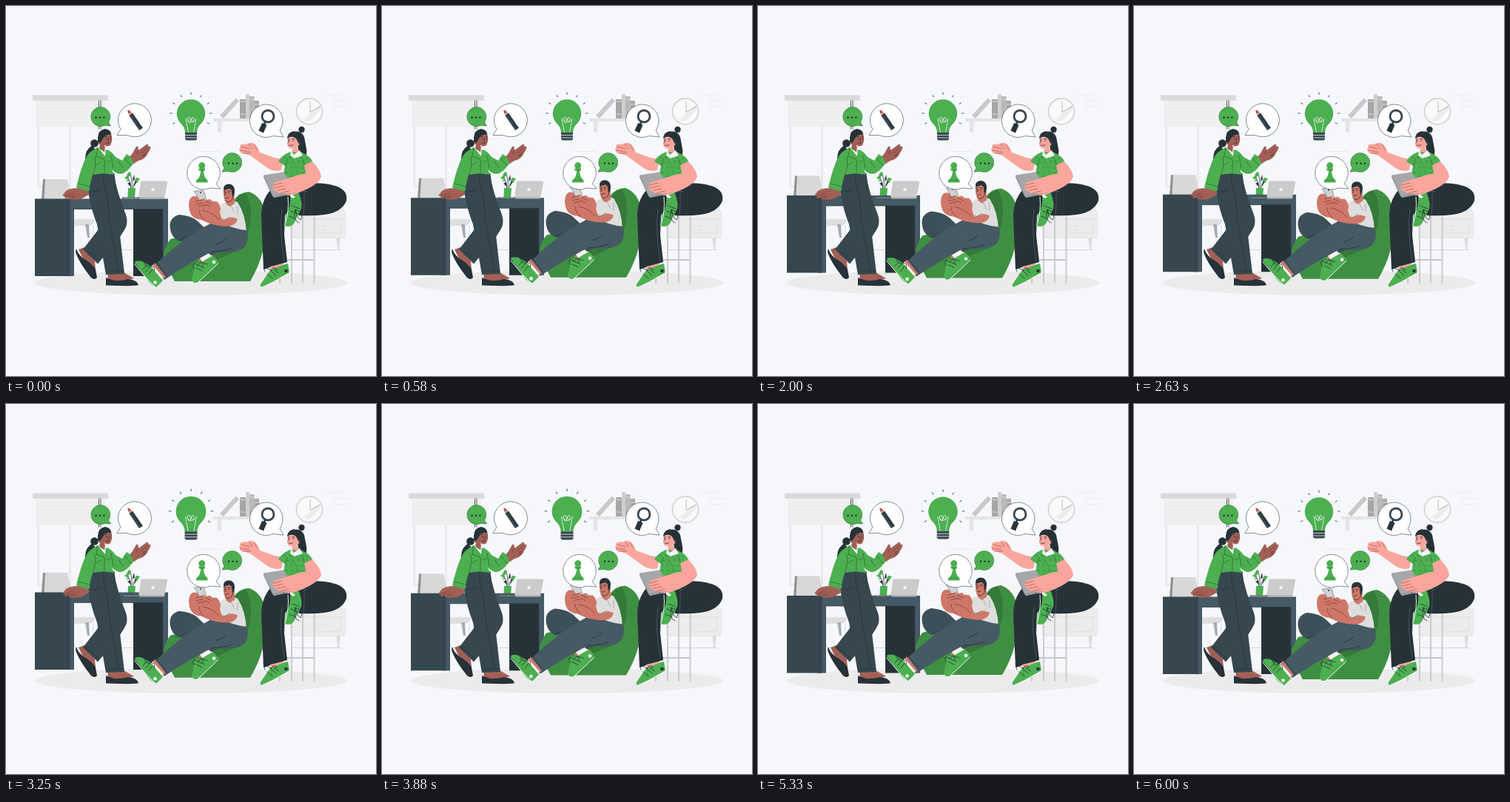
An HTML page that plays this animation: 500 by 500 pixels, repeating every 6.04 s.

```html
<!DOCTYPE html>
<html lang="en">
<head>
<meta charset="utf-8">
<title>Team sharing ideas</title>
<style>
html, body { margin: 0; height: 100%; overflow: hidden; background: #f5f7fb; }
svg { display: block; width: 100vw; height: 100vh; }
.line { fill: none; stroke-linecap: round; stroke-linejoin: round; }
.green { fill: #4caf50; }
.ink { fill: #263238; }
.slate { fill: #37474f; }
.steel { fill: #455a64; }
.tan { fill: #a35f56; }
.brown { fill: #ce7768; }
.pink { fill: #faa69c; }
.thin { stroke: #263238; stroke-width: .8; }
.pale { stroke: #e2e4e6; stroke-width: 1.4; }
.bubble { fill: #fff; stroke: #263238; stroke-width: .55; stroke-linejoin: round; }
</style>
</head>
<body>
<svg viewBox="0 0 500 500">
  <ellipse cx="250" cy="374" rx="211" ry="17" fill="#ebebeb"/>

  <!-- room -->
  <g>
    <path class="line" stroke="#e6e8ea" stroke-width="2.600" d="M43.500 162V244H50M86.500 162V262"/>
    <path fill="#f0f0f1" d="M40 128H134V162.500H40Z"/>
    <path class="line" stroke="#e4e5e7" stroke-width=".6" d="M41 133H133M41 138H133M41 143H133M41 148H133M41 153H133M41 158H133M40 162.500H134"/>
    <path fill="#dadada" d="M36 120.500H138V128H36Z"/>
    <path class="line thin" d="M125.500 128V166M128 128V166"/>
    <path class="line" stroke="#c5c8cb" stroke-width=".7" d="M155 329.500H172M385 329.500H453"/>
    <path fill="#e4e4e4" d="M280 152H346V156H291V171H286V156H280Z"/>
    <path fill="#c9c9c9" d="M289 148L310.500 124.500L315 128.500L294 152Z"/>
    <path fill="#a6a6a6" d="M316 126H324V152H316Z"/>
    <path fill="#cfcfcf" d="M324 119H329V152H324Z"/>
    <path fill="#b9b9b9" d="M329 122H335.500V152H329Z"/>
    <path fill="#a9a9a9" d="M335.500 128H342V152H335.500Z"/>
    <path class="line" stroke="#e2e2e2" stroke-width=".8" d="M317 129H323M317 146H323M330 126H335M336 133H341"/>
    <circle cx="410" cy="142.500" r="17.500" fill="#fafafa" stroke="#d7d7d7" stroke-width="2"/>
    <path fill="#ececec" d="M400 155L424 134L425 140L410 156Z"/>
    <path class="line" stroke="#a5a7a9" stroke-width=".8" d="M411 129V143.500L424.500 136"/>
    <path class="line" stroke="#e8eaed" d="M433 120H453M444 128H463M444 136H458M443 129V136M262 196.500H290"/>
    <path fill="#ececed" stroke="#e3e3e4" d="M385 276H458V313.500H385Z"/>
    <path class="line" stroke="#dfdfe0" d="M386 288H457M419 288V307H453V288M423 297H432V302H423Z"/>
    <path fill="#dcdcdc" d="M446.500 313.500H451.500L450 329H448Z"/>
    <path fill="#dfdfe0" d="M90 288H120Q119 297 111 297H90Z"/>
    <path fill="#a9abad" d="M107 295H112L113 313H110Z"/>
    <path class="line pale" d="M118 297V329"/>
  </g>

  <!-- plant -->
  <g>
    <path class="line thin" d="M169 247Q168 237 164 230M170 247Q171 236 168 227M171 247Q175 242 176 235"/>
    <path class="green" d="M160 232L163 230L165 225L168 224L169 228L166 231L164 235ZM173 237L176 232L181 233L177 239ZM162 237L166 234L167 237Z"/>
    <path class="ink" d="M170.500 237L173 228L174 234ZM164 240L168 238L169 244ZM171 244L175 237L177 238Z"/>
    <path class="green" d="M165 246H175L174 259H164.500Z"/>
  </g>

  <!-- desk -->
  <g id="desk">
    <path fill="#d8d8d8" d="M52 234H83L89 261H50Z"/>
    <path fill="#8f9193" d="M50 234H53L51.500 261H48Z"/>
    <path class="ink" d="M172 273H212V365H172Z"/>
    <path class="steel" d="M80 260.500H219V365H212V274.500H92V365H80Z"/>
    <path class="slate" d="M39 260.500H86V365H39Z"/>
    <path class="line" stroke="#2b383f" stroke-width=".7" d="M86 262V365M92 274.500H212"/>
  </g>
  <g>
    <path fill="#cbcbcc" d="M184 236.500H216Q218.500 236.500 218 239L214 260H179L182 239Q182 236.500 184 236.500Z"/>
    <path fill="#aeb0b1" d="M179 258.500H214L213.500 260.500H178Z"/>
    <circle cx="198.500" cy="248" r="2.300" fill="#f2f2f2"/>
    <path class="slate" d="M157 258.500H180V260.500H157Z"/>
    <path class="line" stroke="#c8cacb" stroke-width=".7" d="M159 259.300H178"/>
  </g>

  <!-- standing woman -->
  <g>
    <path class="tan" d="M98 329L106 326L120 345L122 368L117 368Z"/>
    <path class="ink" d="M95 328Q98 338 109 344Q118 350 121 356L123 367Q120 371 115 367Q98 346 94 332Z"/>
    <path class="tan" d="M137 360L159 360L173 368Q162 373 138 370Z"/>
    <path class="ink" d="M135 367Q149 374 165 369Q177 370 179 377Q178 379 135 377.500Z"/>
    <path class="slate" d="M130 228H146Q150 252 162 282Q165 292 162 299Q156 310 150 317L124 348.500L104 329L128 298Z"/>
    <path class="slate" d="M118 226H146.500Q149 246 149.500 270L160 362L135 363L123 295Q115 275 111 251Q112 238 118 226Z"/>
    <path class="line thin" d="M134 247Q139 270 140 292L152 358M128 248Q120 253 115 250M106 328L126 344M135 358H159M131 229L134 247M148 249Q146 246 146 239"/>
    <circle class="ink" cx="119.500" cy="185.500" r="5.300"/>
    <path class="ink" d="M117 188Q107 194 107 206Q107 214 111 217Q119 210 121 195Z"/>
    <path class="tan" d="M126 178Q133 171 142 172Q145 181 141 188Q137 191 133 188L134 199L125 199L127 188Q122 184 126 178Z"/>
    <path class="ink" d="M124 178Q125 167 134 166Q142 167 142 174Q134 172 130 181L127 185L124 184Z"/>
    <path class="line thin" d="M134 177L136 176.500M140 176.500L142 177M138 179L139 183M135 185Q138 186.500 140 185"/>
    <circle class="ink" cx="136" cy="179.500" r=".8"/><circle class="ink" cx="141" cy="179.500" r=".8"/>
    <path class="tan" d="M98 246Q86 246 81 250L77 255Q76 257 79 257L80 260L84 259L88 262L101 261L112 255L111 245Z"/>
    <path class="line" stroke="#623832" stroke-width=".7" d="M80 257L90 253M83 259L92 256M88 261L95 257"/>
    <path class="tan" d="M161 211L171 199L176 190Q179 188 179 195L190 187Q193 186 192 190Q197 189 195 193L191 200Q188 207 179 209L168 216Z"/>
    <path class="line" stroke="#623832" stroke-width=".7" d="M179 195L176 200M192 190L183 199M194 194L185 202M191 200L185 204"/>
    <path class="green" d="M123 191Q131 195 135 194Q142 195 148 204L157 209L163 200Q171 204 172 213Q163 226 155 227Q149 227 143 221L146 228Q131 225 117 228L113 244Q114 252 109 250L95 245Q104 207 113 198Z"/>
    <path fill="#f5f5f5" d="M124 191L134 203L135 193L132 191L130 196Z"/>
    <path class="tan" d="M126 190L134 190L133 198Z"/>
    <path class="line" stroke="#28642d" stroke-width=".7" d="M120 202Q123 216 117 228M124 192L122 203L133 207L133 226M142 202L145 219M161 205Q165 213 169 215M128 211L122 215M136 211L141 209M98 240L112 244M152 210L158 219"/>
  </g>

  <!-- man on bean bag -->
  <g id="lounge">
    <path fill="#3f8f42" d="M228 372L213 344Q211 330 222 315L285 300L308 263Q314 252 328 251Q347 257 351 283Q355 330 330 372Z"/>
    <path fill="#357a38" d="M309 264Q315 253 324 253Q333 267 330 292Q327 325 303 335L270 350L272 321L318 306Z"/>

    <path class="brown" d="M273 330L282 340L270 351L260 344Z"/>
    <path fill="#f4f4f4" d="M262 341L275 333L280 340L269 350Z"/>
    <path class="green" d="M255 348L266 345L278 338Q285 340 287 347L276 357L259 374Q252 376 251 371Z"/>
    <path class="line" stroke="#fff" stroke-width="1" d="M286.500 348L276 358L259 374Q254 376 251.500 372"/>
    <circle cx="281" cy="346" r="2.300" fill="#fff"/>
    <path class="line thin" d="M259 350L268 354M257 354L265 358M263 346L272 349M259 350Q250 344 254 355M259 350Q267 342 266 352"/>
    <path fill="#3d5059" d="M222 302Q219 286 234 282Q249 283 258 290L298 328L277 337L260 323L233 317Q224 313 222 302Z"/>
    <path class="line thin" d="M233 317Q239 315 242 312"/>

    <path fill="#dedede" d="M291 268L302 262L313 265Q324 282 325 307L287 306L294 286L287 277Z"/>
    <path class="line" stroke="#9c9c9c" stroke-width=".8" d="M313 271Q314 286 306 295M303 267L309 280"/>
    <path class="steel" d="M200 351Q244 309 284 290Q308 302 325 303Q330 317 321 327Q310 336 278 332Q245 349 214 370Z"/>
    <path class="line thin" d="M284 322Q293 319 297 315M205 348L218 366M278 332Q298 331 306 327"/>

    <path class="brown" d="M299 260L309 258L309 267L302 271L297 267Z"/>
    <path class="brown" d="M294 247Q299 242 307 246Q311 253 307 262Q302 267 296 264Q293 256 294 247Z"/>
    <path class="ink" d="M294 249Q293 241 301 240.500Q309 241 309 250L307.500 257L305.500 257L305 249L302 246.500Z"/>
    <path class="line thin" stroke-width="1.200" d="M307 257Q306 264 300 265L296.500 263.500"/>
    <path class="line thin" d="M294.500 250.500L297 250M300 250L303 250.500M297 252L296 256M296.500 259.500Q299 260.500 301 258.500"/>
    <circle class="ink" cx="296" cy="252.500" r=".8"/><circle class="ink" cx="301" cy="252.500" r=".8"/>

    <path class="brown" d="M247 268Q248 255 257 257L270 264L285 264Q292 271 289 279L293 290L313 283Q314 294 304 297Q285 300 264 289Q247 288 247 268Z"/>
    <path fill="#cfd2d3" stroke="#75787a" stroke-width=".7" d="M254 250.500L265 249Q267 249 267.500 251L271 263L267 274L257 254Z"/>
    <circle cx="263" cy="252" r="1" class="ink"/>
    <path class="brown" d="M255 265Q256 261 261 262L268 260Q270 262 266 264L270 265L271 271L261 275ZM267 263L276 261L281 266L275 275L267 270Z"/>
    <path class="line" stroke="#713d34" stroke-width=".7" d="M257 264L265 262M257 268L266 266M260 271L269 269M270 264L278 268M269 268L275 271M266 276Q280 279 288 289M293 290L304 285M261 276Q261 284 268 289"/>
    <path fill="#dedede" d="M301 276L314 282L314 288L298 283Z"/>

    <path class="brown" d="M201 347L216 366L207 373L193 356Z"/>
    <path fill="#f4f4f4" d="M198 350L213 367L208 373L193 356Z"/>
    <path class="green" d="M174 347Q174 343 184 345L195 351L212 371L203 380Q195 377 189 367Z"/>
    <path class="line" stroke="#fff" d="M174 349L189 367L202 380"/>
    <circle cx="201.500" cy="373.500" r="2.300" fill="#fff"/>
    <path class="line thin" d="M191 349L185 356M195 352L189 359M198 356L193 363M190 352Q181 340 193 348M191 352Q204 350 200 359"/>
  </g>

  <!-- woman on stool -->
  <g>
    <path class="line" stroke="#c6c7c9" stroke-width="1.800" d="M370 260V374M386 260V374M401 260V374M416.500 260V374M370 343H416M386 282H416"/>
    <path class="pink" d="M375 207L363 205Q354 202 343 198Q341 190 335 186Q330 183 328 186L318 187Q315 189 317 191Q314 193 316 196Q316 199 320 199L330 202L352 218Q362 225 372 222Z"/>
    <path class="line" stroke="#a2564e" stroke-width=".7" d="M318 190L329 193M317 195L329 197M320 199L331 199M328 186L333 193M335 187L339 194"/>
    <path class="ink" d="M374 232L407 234L410 239Q437 239 450 245Q462 251 460 263Q454 279 430 282Q414 284 396 283L389 268L377 283L376 310L380 346L348 356L345 284Q345 262 358 248Z"/>
    <path class="line" stroke="#53636b" stroke-width=".7" d="M403 250Q404 266 402 283M397 249L407 251M373 274Q369 307 376 344M398 247Q386 257 387 268"/>
    <path class="green" d="M388 253L396 253Q401 268 399 274L389 294Q384 300 377 297L378 283Q386 270 384 255Z"/>
    <path class="line" stroke="#fff" stroke-width=".9" d="M381 258Q383 276 377 296"/>
    <path class="line thin" d="M387 270L397 274M385 277L394 281M383 284L390 287M391 275Q404 280 398 289Q393 286 391 275Q387 290 396 293"/>
    <path class="pink" d="M357 352L375 348L376 353L359 361Z"/>
    <path class="green" d="M357 357L377 349L381 348L383 360L361 373L347 380Q343 380 344 376Z"/>
    <path class="line" stroke="#fff" d="M383 361L361 373L346 380"/>
    <circle class="ink" cx="378.500" cy="358" r="2.300"/>
    <path class="line thin" d="M357 357L365 364M353 362L360 368M361 355L368 361M358 357Q345 350 350 359M358 357Q363 349 366 357"/>

    <circle class="ink" cx="399.500" cy="167" r="4.200"/>
    <path class="ink" d="M386 171Q398 166 403 177Q405 187 406 193Q407 202 403 206Q396 201 394 189Z"/>
    <path class="pink" d="M381 177Q388 172 394 178L397 185Q396 190 393 190L397 200L386 201L387 192Q382 193 380 188Z"/>
    <path class="ink" d="M380 178Q381 170 390 169L399 179L396 187L392 179Q386 174 380 179Z"/>
    <path class="line thin" d="M381 180L383 179.500M387 179.500L390 180M383 181L381 185M382 188Q385 190 388 187.500M403 185L406 204"/>
    <circle class="ink" cx="382.500" cy="181.800" r=".8"/><circle class="ink" cx="388" cy="182" r=".8"/>
    <path class="pink" d="M400 209L413 209Q425 221 426 231Q423 240 396 252Q383 258 376 255L365 252L361 245Q366 238 382 234L403 229Z"/>
    <path class="green" d="M384 197L400 198Q411 203 414 210L403 215L407 235L374 231L377 216L368 210Q372 202 384 197Z"/>
    <path class="line" stroke="#2f7434" stroke-width=".8" stroke-dasharray="1.500 6" d="M376 205L410 206M380 212L403 211M378 218L404 219M378 225L405 226M386 230L404 232M383 203L397 229"/>
    <path class="line" stroke="#28642d" stroke-width=".7" d="M377 216L380 207M403 215L401 207"/>
    <path fill="#f5f5f5" d="M385 195L389 201L397 195L401 202L390 206L384 202Z"/>
    <path fill="#a5a7a8" d="M348 228.500L374 224.500Q376 224.500 377 227L389 252Q388 254 386 254L363 259Q361 259 360 257L348 231Z"/>
    <path class="line" stroke="#7e8284" stroke-width=".7" d="M348.500 231L361 257.500L386 253"/>
    <path class="pink" d="M390 230Q407 224 407 228Q424 221 425 232Q422 242 396 252Q382 255 371 253Q364 252 366 249Q360 250 361 246Q359 244 362 242Q360 239 364 238L377 234Z"/>
    <path class="line" stroke="#a2564e" stroke-width=".7" d="M362 242L373 239M362 246L375 243M367 249L378 247M371 253L382 250"/>
    <path fill="#fff" d="M385 254L391 258L388 260L384 257Z"/>
  </g>

  <!-- ideas -->
  <path class="bubble" d="M155 166.500A22.500 22.500 0 1 1 164 174.500L150 174.500Z"/>
  <g transform="translate(174 154) rotate(-34.500)">
    <path class="slate" d="M-3-9.500H3V15H-3Z"/>
    <path fill="#f0b8aa" d="M-3-9.500L-1-15H1L3-9.500Z"/>
    <path fill="#b45f58" d="M-2.400-11L-1-16H1L2.400-11Z"/>
    <path class="line" stroke="#182126" stroke-width=".7" d="M1-9V14.500"/>
  </g>
  <path class="bubble" d="M284 240A22.300 22.300 0 1 0 276 246L290 247Z"/>
  <path class="green" d="M257 238.500V235.500L259 234Q263 230 263 222H260.500V219.500H262.500A4.500 4.500 0 1 1 267 219.500H269V222H267Q267 230 271 234L272.500 235.500V238.500Z"/>
  <path class="line" stroke="#2f7434" stroke-width=".7" d="M258.500 235H271M261 222H268.500"/>
  <path class="bubble" d="M370 168A22.300 22.300 0 1 0 361 175.500L375 177Z"/>
  <circle cx="354" cy="149" r="8" fill="#fff" stroke="#37474f" stroke-width="2.800"/>
  <path class="line" stroke="#37474f" stroke-width="3" d="M350.500 156L349.500 158.500"/>
  <path class="ink" d="M346 158L352.500 160.500L348 171.500L341.500 168.500Z"/>
  <g id="dots">
    <path class="green" stroke="#28642d" stroke-width=".5" d="M138.500 157A13 13 0 1 0 133 161.500L141.500 162Z"/>
    <circle class="ink" cx="121.500" cy="150.800" r="1.200"/><circle class="ink" cx="127" cy="150.800" r="1.200"/><circle class="ink" cx="132.500" cy="150.800" r="1.200"/>
  </g>
  <use href="#dots" transform="matrix(-1 0 0 1 433.500 62)"/>

  <g id="bulb">
    <path class="green" d="M242 171Q242 164 236 158.500A19.200 19.200 0 1 1 264 158.500Q258 164 258 171Z"/>
    <path class="line" stroke="#d9f0da" stroke-width=".9" d="M246.500 171L243 152M253.500 171L257 152M245.500 154Q250 160 249.500 153Q247 148 245.500 152Q246 159 250.500 157Q255 156 253.500 151Q251 149 250.500 153Q251 159 255 155"/>
    <path class="slate" d="M242 171H258V180L256 181.500H244L242 180Z"/>
    <path class="line" stroke="#e7eaec" stroke-width=".8" d="M242 174.500H258M242 178H258"/>
    <g id="rays"></g>
  </g>
</svg>
<script>
const LOOP = 6040, LIFT = 6.67, BEAT = 750, BEAT_ON = 380;
const part = id => document.getElementById(id);
const desk = part('desk'), lounge = part('lounge'), bulb = part('bulb');

for (let a = -210; a <= 30; a += 30)
  part('rays').innerHTML +=
    `<path class="line thin" transform="translate(250 145) rotate(${a})" d="M25.500 0H28"/>`;

// Linear rise and fall over one period
const float = (t, period) => -LIFT * (1 - Math.abs(1 - 2 * (t % period) / period));

function pulse(t) {
  const phase = t % BEAT;
  return phase < BEAT_ON ? 1 + .08 * Math.sin(Math.PI * phase / BEAT_ON) ** 2 : 1;
}

function draw() {
  const t = performance.now() % LOOP;
  desk.setAttribute('transform', `translate(0 ${float(t, 6000)})`);
  lounge.setAttribute('transform', `translate(0 ${float(t, 1500)})`);
  bulb.setAttribute('transform', `translate(250 149) scale(${pulse(t)}) translate(-250 -149)`);
  requestAnimationFrame(draw);
}
draw();
</script>
</body>
</html>
```
